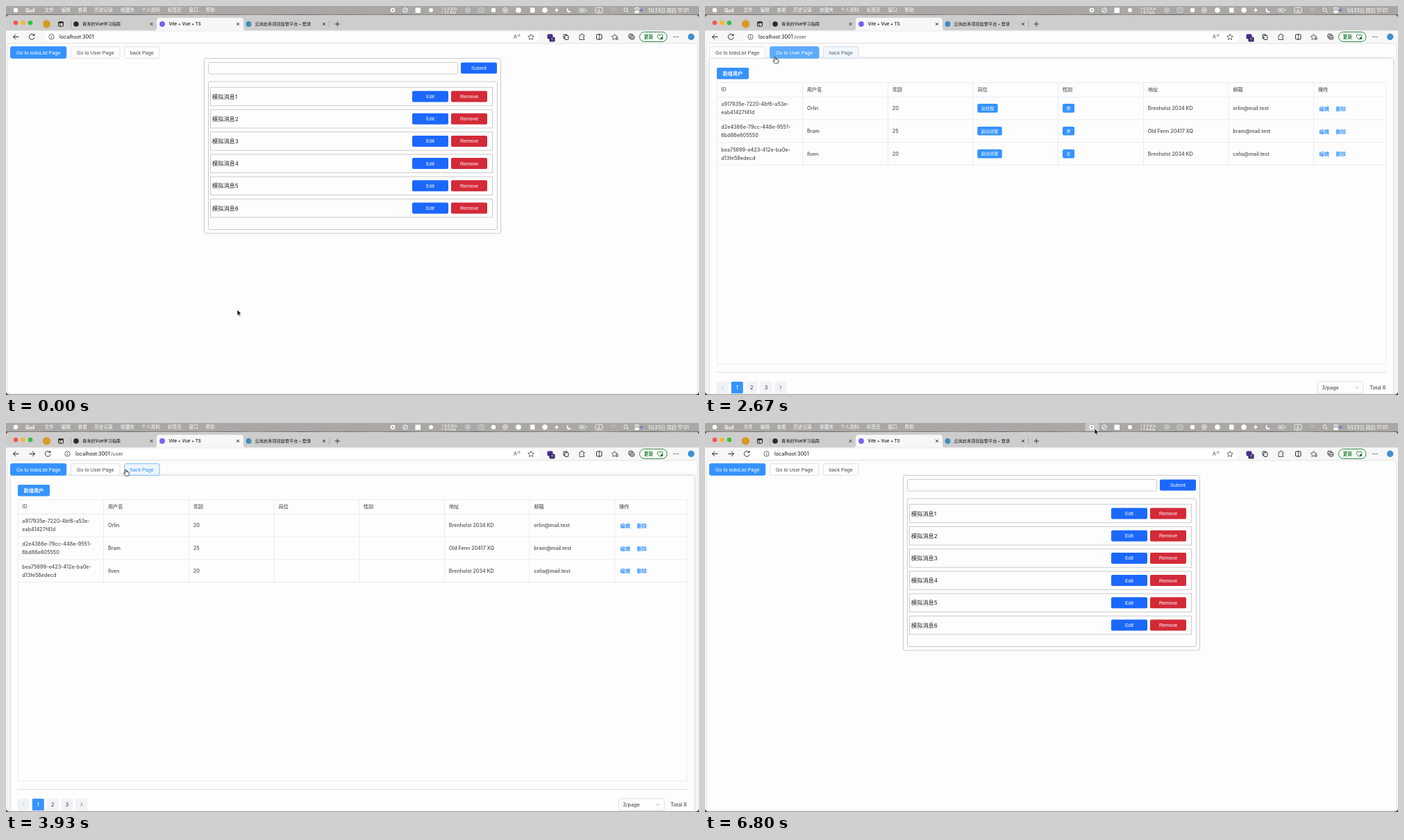
These frames come from a looping animation (998x561 px, 6.87 s). An HTML page:

```html
<!DOCTYPE html>
<html lang="zh-CN">
<head>
<meta charset="utf-8">
<title>Vite + Vue + TS</title>
<style>
html, body { margin: 0; width: 100%; height: 100%; overflow: hidden; background: #4b4038; }
svg { display: block; }
#stage { width: 998px; height: 561px; }
text { font-family: Inter, "Noto Sans CJK SC", "Noto Sans CJK", sans-serif; white-space: pre; stroke: none; }
.arial { font-family: "Liberation Sans", Arial, sans-serif; }

#user, .path, #tags, #nav, #forward, #ticker, #press, #arrow, #hand { animation: 6.87s step-end infinite; }
#user, .path { animation-name: user; }
#tags { animation-name: tags; }
#nav { animation-name: nav; }
#forward { animation-name: forward; }
#ticker { animation-name: ticker; }
#press { animation-name: press; }
#arrow { animation-name: arrow; }
#hand { animation-name: hand; }
#cursor { animation: move 6.87s linear infinite; }
#todo { animation: todo 6.87s linear infinite; }
#people { animation: people 6.87s linear infinite; }
#back { animation: back 6.87s linear infinite; }
.btn text { fill: currentColor; }

@keyframes user { 0% { opacity: 0 } 26.06% { opacity: 1 } 44.5% { opacity: 0 } 57.06% { opacity: 1 } 69.8%, to { opacity: 0 } }
@keyframes tags { 0% { opacity: 0 } 27.1% { opacity: 1 } 57.06% { opacity: 0 } 58.1%, to { opacity: 1 } }
@keyframes nav { 0% { transform: none } 57.06%, to { transform: translateX(23px) } }
@keyframes forward { 0% { opacity: 0 } 57.06%, to { opacity: 1 } }
@keyframes ticker {
  0% { transform: none } 1.02% { transform: translateY(-20px) } 30.1% { transform: translateY(-40px) }
  59.7% { transform: translateY(-60px) } 89.2%, to { transform: translateY(-80px) }
}
@keyframes press { 0% { opacity: 0 } 97.9%, to { opacity: 1 } }
@keyframes arrow { 0% { opacity: 1 } 22% { opacity: 0 } 78.2%, to { opacity: 1 } }
@keyframes hand { 0% { opacity: 0 } 22% { opacity: 1 } 78.2%, to { opacity: 0 } }
@keyframes move {
  0% { transform: translate(333px, 438px) }
  4% { transform: translate(333px, 436px) }
  10.6% { transform: translate(333px, 424px) }
  16% { transform: translate(240px, 240px) }
  21% { transform: translate(150px, 84px) }
  24.5%, 27% { transform: translate(135.5px, 70.5px) }
  31% { transform: translate(185px, 70px) }
  37% { transform: translate(190px, 70px) }
  38.9% { transform: translate(100px, 73.5px) }
  41% { transform: translate(70px, 72px) }
  43.7%, 47% { transform: translate(64.5px, 70px) }
  52%, 77% { transform: translate(172.5px, 67px) }
  78.5% { transform: translate(190px, 62px) }
  84.5% { transform: translate(562px, 3px) }
  86%, to { transform: translate(561px, 8px) }
}
@keyframes todo {
  0%, 25.2%, 48.5%, to { fill: #3593fe; stroke: #3593fe; color: #fff }
  26.2% { fill: #a3cfff; stroke: #9cc6f0; color: #969ba3 }
  27.2%, 39.3% { fill: #fefefe; stroke: #dcdfe6; color: #484a4f }
  40.3%, 43.7% { fill: #ecf5ff; stroke: #c6e2ff; color: #3593fe }
  44.7% { fill: #7cbbfe; stroke: #7cbbfe; color: #e0eefc }
  45.7%, 47.5% { fill: #79bbff; stroke: #79bbff; color: #fff }
}
@keyframes people {
  0%, 22%, 45.7%, to { fill: #fefefe; stroke: #dcdfe6; color: #484a4f }
  23%, 25.2% { fill: #ecf5ff; stroke: #c6e2ff; color: #3593fe }
  26.2% { fill: #a0cfff; stroke: #8cc2fb; color: #a0cfff }
  27.2%, 30% { fill: #79bbff; stroke: #79bbff; color: #fff }
  31%, 37.8%, 40%, 43.7% { fill: #3593fe; stroke: #3593fe; color: #fff }
  38.9% { fill: #5eaaff; stroke: #5eaaff; color: #fff }
  44.7% { fill: #d0e6fb; stroke: #b5d6f8; color: #66696e }
}
@keyframes back {
  0%, 30%, 39.8%, 51%, 79%, to { fill: #fefefe; stroke: #dcdfe6; color: #484a4f }
  31%, 37.8%, 52%, 56%, 60%, 68.5%, 72%, 78% { fill: #ecf5ff; stroke: #c6e2ff; color: #3593fe }
  38.9% { fill: #f1f7fd; stroke: #d5dde9; color: #56657a }
  57.1%, 69.8% { fill: #ecf5ff; stroke: #7ab8fb; color: #3593fe }
}
</style>
</head>
<body>
<svg id="stage" viewBox="0 0 998 561"></svg>
<script>
const BLUE = '#3593fe', INK = '#4c4e53', LINE = '#e9ecf3', DARK = '#2a2a2a';

const box = (x, y, w, h, fill, r = 0, more = '') =>
  `<rect x="${x}" y="${y}" width="${w}" height="${h}" rx="${r}" fill="${fill}" ${more}/>`;
const frame = (x, y, w, h, stroke, r = 0, fill = 'none') => box(x, y, w, h, fill, r, `stroke="${stroke}"`);
const label = (x, y, s, size, fill, more = '') =>
  `<text x="${x}" y="${y}" font-size="${size}" fill="${fill}" ${more}>${s}</text>`;
const line = (d, stroke, width = 1, more = '') =>
  `<path d="${d}" fill="none" stroke="${stroke}" stroke-width="${width}" ${more}/>`;
const dot = (x, y, r, fill, more = '') => `<circle cx="${x}" cy="${y}" r="${r}" fill="${fill}" ${more}/>`;
const ring = (x, y, r, stroke, width = .9) => dot(x, y, r, 'none', `stroke="${stroke}" stroke-width="${width}"`);
const group = (id, s, more = '') => `<g id="${id}" ${more}>${s}</g>`;
const MID = 'text-anchor="middle"', BOLD = 'font-weight="600"', MEDIUM = 'font-weight="500"', ARIAL = 'class="arial"';
const star = (x, y) => line(`M${x} ${y - 4}l1.3 2.7 2.9.4-2.1 2 .5 2.9-2.6-1.4-2.6 1.4.5-2.9-2.1-2 2.9-.4z`, DARK, .7);

function menuBar() {
  const W = '#fff';
  const menus = [[55.5, '文件'], [79.5, '编辑'], [103.5, '查看'], [127.3, '历史记录'], [165, '收藏夹'],
    [195.2, '个人资料'], [233, '标签页'], [263.5, '窗口'], [287.5, '帮助']];
  const rates = [['0.0', '1.5'], ['0.5', '3.0'], ['0.0', '3.1'], ['3.1', '3.6'], ['2.0', '1.4']];
  const ticks = rates.map(([up, down], i) =>
    label(631, 5.6 + i * 20, up + ' K/s', 5.4, W, MEDIUM) + label(631, 11.2 + i * 20, down + ' K/s', 5.4, W, MEDIUM)).join('');
  return box(0, 0, 998, 12.2, '#a9a8a7')
    + box(0, 12.2, 998, 1.2, 'url(#desk)')
    + dot(14, 6, 3.3, W)
    + label(28, 8.5, 'Quil', 6.9, W, 'font-weight="700"')
    + menus.map(([x, s]) => label(x, 8.4, s, 6.7, W, MEDIUM)).join('')
    + group('press', box(547.5, 0, 20, 12, '#c9c8c7', 2))
    + dot(557, 6, 3.3, W) + dot(557, 6, 1.3, '#999')
    + ring(575, 6, 3.3, W, 1) + line('M573 8l4-4', W)
    + box(589.5, 2.5, 7.5, 7.5, W) + dot(612, 6, 3, W)
    + `<svg x="0" y="0" width="998" height="12.4">${group('ticker', ticks)}</svg>`
    + line('M628.5 5V2.5M628.5 7.5V10', W, .8)
    + ring(665, 6, 3.3, '#dedede') + ring(665, 6, 1.4, '#dedede')
    + frame(680, 2.8, 8, 6.5, '#d4d4d4', 1) + line('M681.5 5h5M681.5 7h5', '#d4d4d4', .7)
    + dot(702, 6, 3.3, W)
    + ring(719, 6, 3.4, W) + `<path d="M718 4.2l3 1.8-3 1.8z" fill="${W}"/>`
    + dot(738, 6, 3.8, W) + box(755, 2.5, 6.5, 7, W) + dot(776, 6, 3.7, W)
    + `<path d="M793 2.3l1 2.7 2.7 1-2.7 1-1 2.7-1-2.7-2.7-1 2.7-1z" fill="${W}"/>`
    + `<path d="M809.5 2.5a3.7 3.7 0 1 0 5 5 3.8 3.8 0 0 1-5-5z" fill="${W}"/>`
    + frame(825.5, 3.5, 9, 5, '#e2e2e2', 1.3) + box(827, 5, 5, 2, '#e2e2e2') + box(835.5, 5, 1, 2, '#e2e2e2')
    + frame(849, 2.2, 10, 7.6, '#f3f3f3', 1.5) + label(854, 8.6, 'A', 6.4, W, MID)
    + line('M871 5a5.5 5.5 0 0 1 8 0M872.7 7a3.2 3.2 0 0 1 4.6 0', '#c5c5c5')
    + ring(892.5, 5.3, 2.6, W) + line('M894.5 7.3l2 2.2', W)
    + frame(905.5, 2.5, 6, 2.6, W, 1.3) + box(905, 6.8, 7, 3.4, W, 1.7) + dot(915.3, 6, 1.5, '#6a4fd8')
    + label(924.5, 8.5, '1月23日 周四 17:01', 6.9, W, MEDIUM);
}

function tabStrip() {
  const close = x => line(`M${x - 2} 24l4 4m0-4l-4 4`, DARK, .9);
  const title = (x, s) => label(x, 28.3, s, 6.2, '#111', MEDIUM);
  return box(0, 13, 998, 547.5, '#f7f7f7', 5)
    + `<path d="M0 36V18a5 5 0 0 1 5-5h988a5 5 0 0 1 5 5v18z" fill="#cecdcd"/>`
    + `<path d="M213 35.5q4 0 4-4V21q0-4 4-4h117q4 0 4 4v10.5q0 4 4 4z" fill="#f7f7f7"/>`
    + box(0, 35.3, 998, 18.7, '#f7f7f7')
    + dot(14, 24.3, 3.3, '#f3564e') + dot(24.5, 24.3, 3.3, '#f5b92f') + dot(35, 24.3, 3.3, '#32bf45')
    + dot(58.5, 26, 5.7, '#d79b25')
    + frame(75.5, 22.8, 7, 6.5, '#222', 1) + line('M75.5 23.8h7', '#222', 1.8) + line('M78 24v5', '#222', .8)
    + line('M93.5 20.5v11M465.5 21v10', '#a5a5a5', .8)
    + dot(101, 26, 3.8, '#2a2a2a') + title(110, '青禾的Vue学习指南') + close(209.5)
    + dot(225, 26, 3.9, '#7562f5') + title(234.5, 'Vite + Vue + TS') + close(334)
    + dot(349.5, 26, 3.9, '#3e8cbd') + title(358.5, '云岚启禾项目监管平台 – 登录') + close(458)
    + line('M473.7 26h7M477.2 22.5v7', DARK, .9);
}

function toolbar() {
  const nav = line('M40.3 42a3.9 3.9 0 1 0 .8 3M41 40v2.6h-2.6', DARK, 1)
    + ring(65.5, 44.5, 3.7, '#444', .8) + line('M65.5 44v2.5M65.5 42.2v.8', '#444', .9)
    + label(77, 47.2, 'localhost:3001', 7.25, '#111') + label(128, 47.2, '/user', 7.25, '#4a4a4a', 'class="path"');
  return box(55, 37.8, 713, 14, '#fff', 7)
    + line('M18.5 44.5h-8M14 41l-3.6 3.5 3.6 3.5', DARK, 1)
    + group('forward', line('M33.5 44.5h8M38 41l3.6 3.5-3.6 3.5', DARK, 1)) + group('nav', nav)
    + label(731, 47.2, 'A', 7, '#444') + line('M737 41q1.5 1.4 0 3M739 40q2 2.3 0 4.5', '#555', .7)
    + star(756, 44.5)
    + box(779.5, 40.5, 8, 7, '#4a2d91', 1.5) + box(782.5, 44.8, 8, 6.8, '#332060', 1.5)
    + label(786.5, 50.3, '11', 5.2, '#fff', MID)
    + frame(803, 41, 5, 6, DARK, 1) + frame(804.8, 42.5, 5, 6, DARK, 1, '#f7f7f7')
    + line('M826 42h2.2q-.3-2 1.3-2t1.3 2h2v2.2q-2-.3-2 1.2t2 1.3v1.8H826z', DARK, .8)
    + frame(850.5, 41, 7.5, 7, DARK, 1) + line('M854.3 39.8v9.5', DARK, .8)
    + star(876.5, 44.5) + line('M879 46h3M879 48h3', DARK, .8)
    + frame(897, 40.5, 5.5, 5.5, DARK, 1) + frame(899, 42.5, 5.5, 5.5, DARK, 1, '#f7f7f7') + line('M900 45.3h3.5M901.7 43.5V47', DARK, .7)
    + frame(912.5, 37.5, 39.5, 14, '#2b8a3f', 7, '#fbfdfb')
    + label(918.8, 47, '更新', 6.6, '#1f7a35', BOLD)
    + line('M942 48.5l-3.6-3.7q-1-2 .6-3.2 1.7-.9 3 .8 1.3-1.7 3-.8 1.6 1.2.6 3.2z', '#1f6a35', .9) + dot(944.5, 46.5, 1.8, '#1f6a35')
    + [961.8, 964.8, 967.8].map(x => dot(x, 44.5, .7, DARK)).join('')
    + dot(986.7, 44.5, 4.7, '#3f8fd2');
}

function listPage() {
  const G = '#cbcbcb', B = '#1c68fd', R = '#d32a38';
  const button = (x, y, s, fill) => box(x, y, 52, 16, fill, 2) + label(x + 26, y + 10.5, s, 7, '#fff', MID + ' ' + ARIAL);
  let out = frame(285.5, 75.5, 427, 252.5, G, 2) + frame(291.5, 81.5, 359, 16.5, G, 2)
    + button(655, 81.5, 'Submit', B) + frame(291.5, 109, 416, 213.5, G, 2);
  for (let i = 0; i < 6; i++) {
    const y = 117.3 + i * 32.2;
    out += frame(294.5, y, 406, 26.5, G) + label(297, y + 16.3, '模拟消息' + (i + 1), 8.2, '#222')
      + button(585, y + 5.2, 'Edit', B) + button(641, y + 5.2, 'Remove', R);
  }
  return out;
}

function userPage() {
  const cols = [17, 140.5, 263.5, 386, 508.5, 631.5, 754, 876.5];
  const heads = ['ID', '用户名', '年龄', '岗位', '性别', '地址', '邮箱', '操作'];
  const rows = [
    ['a917935e-7220-4bf6-a53e-', 'eab41427f41d', 'Orlin', 20, '总经理', '男', 'Brenholst 2034 KD', 'orlin@mail.test'],
    ['d2e4386e-79cc-448e-9551-', '6bd86e605550', 'Bram', 25, '副总经理', '男', 'Old Fenn 20417 XQ', 'bram@mail.test'],
    ['bea75699-e423-412e-ba0e-', 'd13fe58edecd', 'Ilven', 20, '副总经理', '女', 'Brenholst 2034 KD', 'celia@mail.test']];
  const tag = (x, y, s) => box(x, y, s.length * 6.1 + 11, 12.7, BLUE, 2)
    + label(x + 5.5, y + 8.6, s, 6.1, '#fff', MEDIUM);
  const cell = (x, y, s) => label(x, y, s, 7.2, INK, MEDIUM);
  let out = box(2.5, 75, 993, 484, '#fdfdfd')
    + box(6.5, 75.7, 985, 500, '#fdfdfd', 2, 'stroke="#dfe2e8" filter="url(#shade)"')
    + box(17, 89, 46, 16.5, BLUE, 2) + label(40, 99.8, '新增用户', 7.2, '#fff', MID + ' ' + BOLD)
    + frame(17.5, 110.5, 963, 405.5, LINE)
    + line('M17 131.3H981M17 164H981M17 196.8H981M17 229.5H981', LINE)
    + cols.slice(1).map(x => line(`M${x} 110.5V229.5`, LINE)).join('')
    + heads.map((s, i) => label(cols[i] + 6.4, 123.2, s, 7.2, '#74777d', BOLD)).join('');
  let tags = '';
  rows.forEach(([id, tail, name, age, job, sex, place, mail], i) => {
    const y = 150.3 + i * 32.8;
    out += cell(23.3, y - 6, id) + cell(23.3, y + 5.8, tail) + cell(147, y, name) + cell(269.8, y, age)
      + cell(637.8, y, place) + cell(760.3, y, mail)
      + label(884.5, y + .5, '编辑', 7.2, BLUE, BOLD) + label(908.5, y + .5, '删除', 7.2, BLUE, BOLD);
    tags += tag(392.3, y - 9.2, job) + tag(515, y - 9.2, sex);
  });
  out += group('tags', tags) + line('M17 528.5H981', '#dcdfe6');
  for (let i = 0; i < 5; i++) {
    const x = 17 + i * 20.8, on = i === 1;
    out += box(x, 541.7, 17, 17, on ? BLUE : '#f0f2f5', 1.5);
    out += i % 4 ? label(x + 8.5, 552.7, i, 7.2, on ? '#fff' : INK, MID + ' ' + MEDIUM)
      : line(i ? `M${x + 7.3} 547.5l2.5 2.6-2.5 2.6` : `M${x + 9.7} 547.5l-2.5 2.6 2.5 2.6`, i ? INK : '#b4b7bd', .8);
  }
  return out + frame(882.5, 541.8, 65.5, 17, '#dcdfe6', 2) + cell(888.3, 552.7, '3/page')
    + line('M936 549l2.8 2.7 2.8-2.7', '#a8abb2', .8) + cell(957, 552.7, 'Total 8');
}

const pageButton = (id, x, w, s) => `<g id="${id}" class="btn"><rect x="${x}" y="58.7" width="${w}" height="16.6" rx="2"/>`
  + `<text x="${x + w / 2}" y="69.6" font-size="7.2" text-anchor="middle" class="arial">${s}</text></g>`;

const cursor = `<path id="arrow" d="M0 0v8.4l1.9-1.8 1.4 3 1.4-.6-1.4-3h2.6z" fill="#111" stroke="#fff" stroke-width=".6"/>`
  + `<path id="hand" d="M-1 .9Q0-.6 1 .9V3.6Q2-.1 2.6 3.9 3.6 2.9 4 4.4 5 3.7 5 5.2V7L4 9.2H-.4L-2.8 6.2Q-3.3 4.4-1 5.6z" fill="#fff" stroke="#111" stroke-width=".8"/>`;

const shades = ['#85786f', '#a08d82', '#756b65', '#a89b92', '#8a7b72', '#6d6561', '#9a8b7e', '#80746c'];
const defs = `<defs><linearGradient id="desk" x2=".25" spreadMethod="repeat">${
  shades.map((c, i) => `<stop offset="${i / 7}" stop-color="${c}"/>`).join('')}</linearGradient>
  <filter id="shade" x="-2%" y="-2%" width="104%" height="104%"><feDropShadow dx="0" dy="0" stdDeviation="2" flood-color="#000" flood-opacity=".16"/></filter>
  <clipPath id="view"><rect x="2" y="54" width="994" height="505.3" rx="4"/></clipPath></defs>`;

document.getElementById('stage').innerHTML = defs + menuBar() + tabStrip() + toolbar()
  + frame(2, 54, 994, 505.3, '#e3e3e3', 4, '#fdfdfd')
  + `<g clip-path="url(#view)">${listPage()}${group('user', userPage())}</g>`
  + pageButton('todo', 6.5, 80.3, 'Go to todoList Page')
  + pageButton('people', 93.6, 70.4, 'Go to User Page')
  + pageButton('back', 170.6, 50.4, 'back Page')
  + group('cursor', cursor);
</script>
</body>
</html>
```
